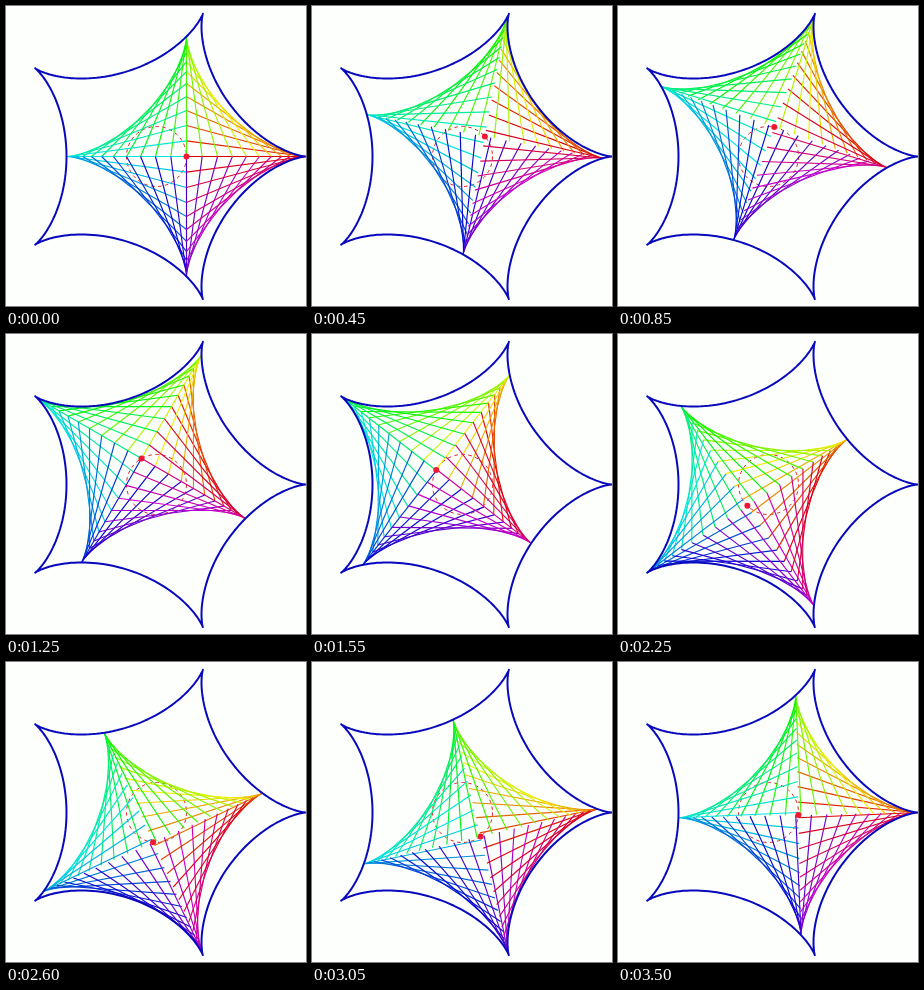
Animation, 300 px wide and 300 px high, one loop 3550 ms. Source, as an HTML page:

```html
<!DOCTYPE html>
<html lang="en">
<head>
<meta charset="utf-8">
<title>Rolling astroid</title>
<style>
html, body { margin: 0; width: 100%; height: 100%; overflow: hidden; background: #fdfffc; }
svg { display: block; width: 100vw; height: 100vh; }
</style>
</head>
<body>
<svg viewBox="0 0 300 300">
  <g transform="translate(150.5 150.5)" fill="none">
    <circle r="30" stroke="#e02028" stroke-width="1" stroke-dasharray="3.5 3.5"/>
    <g id="rods" stroke-width="1.15"></g>
    <path id="shell" stroke="#0808bc" stroke-width="2" stroke-linejoin="round"/>
    <circle id="hub" r="3" fill="#f01834"/>
  </g>
</svg>
<script>
const LOOP = 3550, STEP = 50, RODS = 48;
const R = 30, LEN = 4 * R;
const rad = d => d * Math.PI / 180;
const el = id => document.getElementById(id);

// time in ms, angle of the hub in degrees
const pace = [[0, 0], [850, 79], [1250, 120], [1900, 187], [2600, 263.5], [3050, 307], [3500, 355], [LOOP, 360]];

function hubAngle(ms) {
  const i = pace.findIndex(p => p[0] > ms);
  const [t0, a0] = pace[i - 1], [t1, a1] = pace[i];
  return a0 + (a1 - a0) * (ms - t0) / (t1 - t0);
}

// rainbow around the compass, darker towards blue and magenta
function tint(dir) {
  const hue = dir + 10 * Math.sin(rad(dir));
  const light = 44 + 4 * Math.cos(rad(hue - 100));
  return `hsl(${hue} 100% ${light}%)`;
}

// five-cusped hypocycloid
let d = "";
for (let i = 0; i < 360; i++) {
  const a = rad(i);
  const x = LEN * Math.cos(a) + R * Math.cos(4 * a);
  const y = R * Math.sin(4 * a) - LEN * Math.sin(a);
  d += (i ? "L" : "M") + x.toFixed(2) + " " + y.toFixed(2);
}
el("shell").setAttribute("d", d + "Z");

const rods = Array.from({ length: RODS }, (_, i) => {
  const dir = i * 360 / RODS;
  const line = document.createElementNS("http://www.w3.org/2000/svg", "line");
  line.setAttribute("stroke", tint(dir));
  el("rods").append(line);
  return { line, dir };
});

function draw(ms) {
  const t = hubAngle(ms), turn = t / 4;
  const cx = R * Math.cos(rad(t)), cy = -R * Math.sin(rad(t));
  const c = Math.cos(rad(turn)), s = Math.sin(rad(turn));
  el("hub").setAttribute("cx", cx);
  el("hub").setAttribute("cy", cy);
  for (const { line, dir } of rods) {
    // each rod slides with its ends on the astroid's two axes
    const a = rad(dir + turn);
    const u = LEN * Math.cos(a), v = LEN * Math.sin(a);
    line.setAttribute("x1", cx + u * c);
    line.setAttribute("y1", cy + u * s);
    line.setAttribute("x2", cx + v * s);
    line.setAttribute("y2", cy - v * c);
  }
}

const start = performance.now();
function tick() {
  const ms = (performance.now() - start) % LOOP;
  draw(Math.floor(ms / STEP) * STEP);
  requestAnimationFrame(tick);
}
tick();
</script>
</body>
</html>
```
